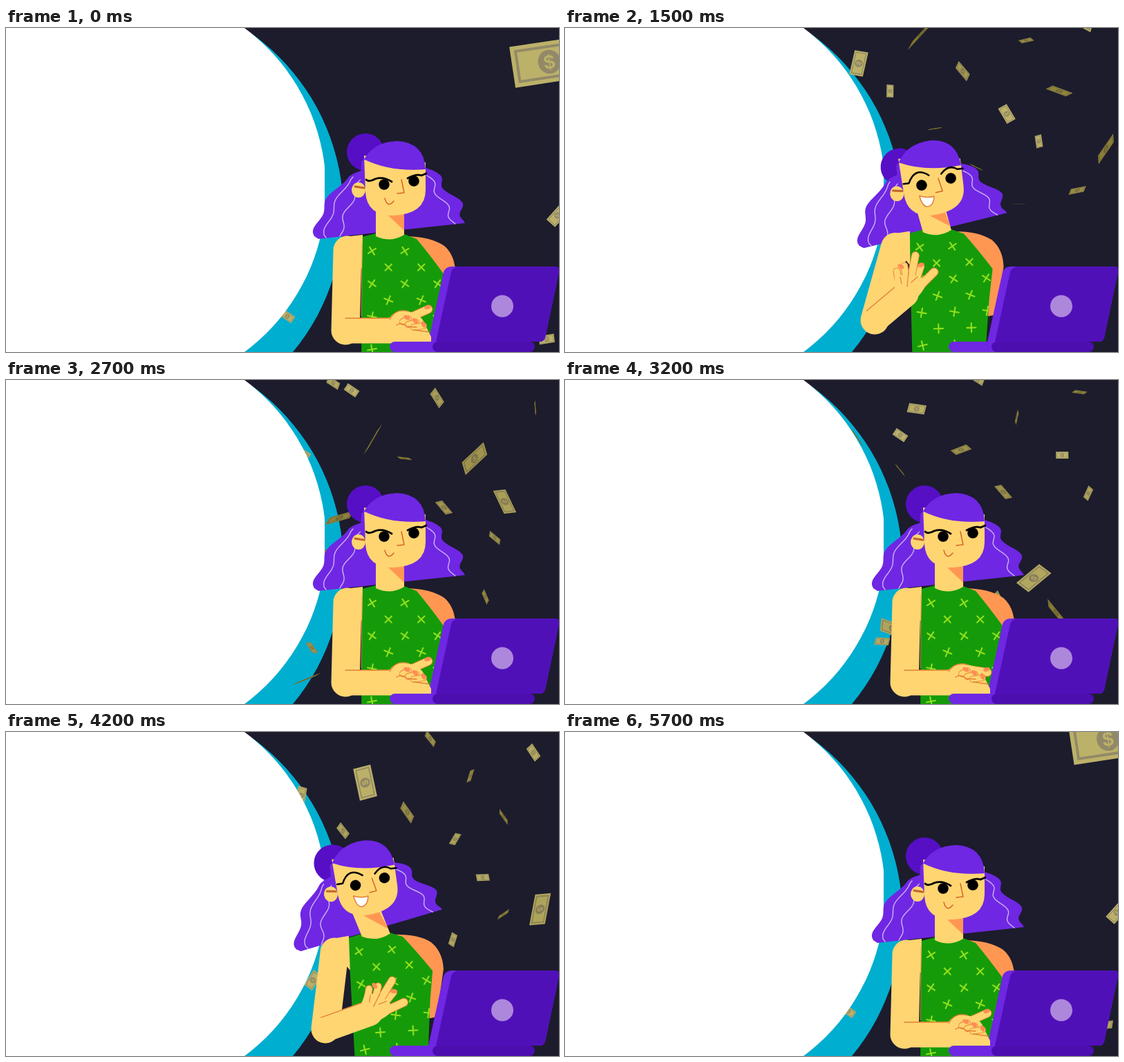
Recreate the animation shown at these times as an HTML page with a canvas. Size 800x470 px, loop 5.8 s.

```html
<!DOCTYPE html>
<html lang="en">
<head>
<meta charset="utf-8">
<title>Money rain</title>
<style>
html, body { margin: 0; width: 100%; height: 100%; overflow: hidden; background: #1c1c2d; }
canvas { display: block; }
</style>
</head>
<body>
<canvas id="stage" width="800" height="470"></canvas>
<script>
const ctx = document.getElementById('stage').getContext('2d');
const LOOP = 5800, STEP = 100, CYCLE = 2900;
const SKIN = '#ffd572', SHADE = '#ff9752', LINE = '#e57f35', NOSE = '#d5652b',
      HAIR = '#6f27e3', DEEP = '#5010b8', GREEN = '#159b0a', LIME = '#93e01c';

const mix = (a, b, k) => a + (b - a) * k;
const mixAll = (a, b, k) => a.map((v, i) => mix(v, b[i], k));
const ease = k => k * k * (3 - 2 * k);
const noise = n => { const s = Math.sin(n * 127.1 + 3.7) * 43758.5453; return s - Math.floor(s); };

function shape(d, color) { ctx.fillStyle = color; ctx.fill(new Path2D(d)); }
function line(d, color, w) {
  ctx.strokeStyle = color;
  ctx.lineWidth = w;
  ctx.lineCap = ctx.lineJoin = 'round';
  ctx.stroke(new Path2D(d));
}
const bar = (a, b, color, w) => line(`M${a}L${b}`, color, w);
function oval(x, y, color, rx, ry = rx, rot = 0) {
  ctx.beginPath();
  ctx.ellipse(x, y, rx, ry, rot, 0, 7);
  ctx.fillStyle = color;
  ctx.fill();
}
// Move the pivot to (x, y) and turn around it: for drawing, and for one point
function placed([px, py], x, y, turn, draw) {
  ctx.save();
  ctx.translate(x, y);
  ctx.rotate(turn);
  ctx.translate(-px, -py);
  draw();
  ctx.restore();
}
function moved([px, py], x, y, turn, [qx, qy]) {
  const c = Math.cos(turn), s = Math.sin(turn), dx = qx - px, dy = qy - py;
  return [x + dx * c - dy * s, y + dx * s + dy * c];
}

/* ---------- falling bills ---------- */
const still = { ax: 0, spin: 0, roll: 0, tilt: 0 };
const bills = [
  { ...still, t: LOOP, x: 786, y: 49, vx: 20, vy: 390, ax: 150, size: 54, angle: -.15 },
  { ...still, t: LOOP, x: 798, y: 272, vx: 10, vy: 100, ax: 150, size: 15, angle: -.84 },
  { ...still, t: LOOP, x: 407, y: 418, vx: -30, vy: 130, size: 10, angle: .6 }
];
for (let i = 0; i < 52; i++) {
  const r = k => noise(i * 7 + k), size = 9 + 17 * r(1) ** 4;
  bills.push({
    t: 330 + i * 74, x: 410 + 390 * (i * .618 % 1), y: -15, ax: 0,
    vx: 50 * r(2) - 25, vy: 175 + 8 * size, size,
    angle: 6.3 * r(3), spin: 3 * r(4) - 1.5, tilt: 6.3 * r(5), roll: 2 + 3 * r(6)
  });
}

function drawBill(b, t) {
  const dt = (t - b.t) / 1000, y = b.y + b.vy * dt;
  if (y < -60 || y > 530) return;
  const tilt = b.tilt + b.roll * dt, tone = .55 + .45 * Math.cos(tilt * 2);
  const rgb = (p, q) => `rgb(${mixAll(p, q, tone).map(Math.round)})`;
  const face = rgb([125, 113, 42], [188, 177, 104]), ink = rgb([92, 82, 38], [146, 137, 104]);
  const rect = (w, h, color) => { ctx.fillStyle = color; ctx.fillRect(-w, -h, 2 * w, 2 * h); };
  ctx.save();
  ctx.translate(b.x + b.vx * dt + b.ax * dt * dt, y);
  ctx.rotate(b.angle + b.spin * dt);
  ctx.scale(b.size / 56, b.size / 56);
  ctx.transform(1, 0, .5 * Math.sin(tilt), Math.cos(tilt), 0, 0);
  rect(56, 31, face);
  rect(50, 25, ink);
  rect(46, 21, face);
  oval(0, 0, ink, 17, 18);
  ctx.fillStyle = face;
  ctx.font = 'bold 30px "Liberation Sans", Arial, sans-serif';
  ctx.textAlign = 'center';
  ctx.fillText('$', 0, 10.5);
  ctx.restore();
}

/* ---------- poses ---------- */
const EYES = [568.5, 224.5], CHEST = [577, 371], SHOULDER = [494, 322], WRIST = [495, 385];
// head and body: x, y, turn; hair: turn and drop of the bun
const type = { head: [568.5, 224.5, 0], hair: [0, 0], body: [577, 371, 0],
  elbow: [491, 439], wrist: [560, 439], open: [0] };
const lean = { ...type, head: [552, 230, -.073], hair: [-.15, 3], body: [574.5, 371, 0], elbow: [489, 440] };
const coil = { ...lean, head: [554.5, 229.5, -.045], hair: [-.092, 1], elbow: [487, 440] };
const swing = { head: [526.5, 217, -.135], hair: [-.18, 11], body: [561, 363, -.06],
  elbow: [462, 431], wrist: [526, 408], open: [1] };
const touch = { head: [537, 223, -.119], hair: [-.133, 17], body: [562, 364, -.03],
  elbow: [448, 424], wrist: [493, 386], open: [1] };
const acts = [[0, type], [300, type], [650, lean], [900, lean], [1300, swing], [1500, touch], [2200, touch],
  [2600, type], [3200, type], [3550, coil], [3800, coil], [4200, swing], [4400, touch], [5100, touch],
  [5500, type], [LOOP, type]];

function poseAt(t) {
  let i = 0;
  while (t >= acts[i + 1][0]) i++;
  const [t0, a] = acts[i], [t1, b] = acts[i + 1], k = ease((t - t0) / (t1 - t0)), pose = {};
  for (const part in a) pose[part] = mixAll(a[part], b[part], k);
  return pose;
}

/* ---------- figure ---------- */
// Wavy lock from one point to another, as path steps
function lock(x0, y0, x1, y1, bulge, ripple) {
  let d = '';
  for (let i = 0; i <= 24; i++) {
    const k = i / 24;
    const x = mix(x0, x1, k) + bulge * Math.sqrt(Math.abs(Math.sin(Math.PI * k))) + ripple * Math.sin(4 * Math.PI * k);
    d += `L${x} ${mix(y0, y1, k)}`;
  }
  return d;
}
const strand = (...p) => line('M' + lock(...p).slice(1), '#cdb2f6', 1.4);

function drawHair([x, y, turn], [hairTurn, drop]) {
  placed(EYES, x, y + drop, turn, () => oval(520, 180, '#560fc5', 27));
  placed(EYES, x, y, hairTurn, () => {
    shape('M545 195' + lock(607, 203, 664, 283, 11, 7) + lock(452, 306, 503, 211, -17, -4) + 'Z', HAIR);
    strand(502, 216, 463, 304, -8, 3);
    strand(516, 218, 483, 302, -4, -4);
    strand(609, 214, 650, 284, 1, 5);
  });
}

function drawBody([x, y, turn], head) {
  placed(CHEST, x, y, turn, () => {
    shape('M570 302Q612 301 634 316Q650 330 650 356L636 425L600 430Z', SHADE);
    const dress = 'M515 303L535 298Q556 308 576 299L594 306Q614 330 634 358L628 400L618 500H514Z';
    shape(dress, GREEN);
    ctx.clip(new Path2D(dress));
    for (let row = -3; row <= 4; row++) for (let col = -2; col <= 2; col++) {
      const cx = CHEST[0] + (col + (row & 1) / 2) * 47.5, cy = CHEST[1] + row * 23.8;
      placed([0, 0], cx, cy, .6 - .2 * row, () => line('M-6.5 0H6.5M0 -6.5V6.5', LIME, 2.1));
    }
  });
  const up = p => moved(EYES, ...head, p), down = p => moved(CHEST, x, y, turn, p);
  const left = down([535, 302]), right = down([576, 300]);
  const jaw = up([576, 258]);
  shape(`M${up([535, 258])}L${jaw}L${right}Q${down([556, 312])} ${left}Z`, SKIN);
  shape(`M${up([553, 272])}L${up([576, 270])}L${mixAll(jaw, right, .85)}Z`, SHADE);
}

function drawHead(head, happy) {
  placed(EYES, ...head, () => {
    shape('M513 224L514 194L522 186L524 224Z', HAIR);
    oval(510, 235, SKIN, 10, 11);
    line('M505 230L518 232', '#c0642a', 3);
    shape('M518 185L520 238Q522 272 560 272Q607 270 607 235V195Z', SKIN);
    shape('M516 194Q530 165 566 164Q605 166 607 205Q556 209 519 191Z', HAIR);
    oval(547, 227, '#000', 7.8);
    oval(590, 222, '#000', 7.8);
    if (happy) {
      line('M521 222H529Q540 199 559 214M577 214Q589 201 601 210H609', '#000', 2.5);
      const mouth = 'M542 242Q553 247 563 245Q561 259 551 259Q544 257 542 242Z';
      shape(mouth, '#fff');
      line(mouth, LINE, 1.5);
    } else {
      line('M521 220Q525 224 534 219Q546 215 558 223M581 218Q594 211 601 214L608 211', '#000', 2.8);
      line('M548 247Q552 262 561 251', NOSE, 1.5);
    }
    line('M572 220L576 239L566 240', NOSE, 1.5);
  });
}

function finger(a, b, w) {
  bar(a, b, LINE, w + 1.8);
  bar(a, b, SKIN, w);
}
const nail = (x, y, rot) => oval(x, y, '#ff8d55', 5, 3, rot);

function typingHand(press) {
  const top = 411 + press * 2;
  finger([584, 420], [611, 408 + press * 16], 11);
  shape(`M552 424Q564 ${top - 5} 582 ${top}Q602 416 606 430L615 448V455H552Z`, SKIN);
  line(`M555 423Q564 ${top - 5} 582 ${top}`, LINE, 1.3);
  for (let i = 0; i < 3; i++) {
    finger([574 + i * 8, 426 + i * 4], [582 + i * 11, 422 + i * 5], 8);
    nail(580 + i * 12, 420 + i * 5, .5 + i * .35);
  }
  nail(610, 405 + press * 15, -.3);
  line('M565 431Q572 426 580 433L594 434M590 438L612 441', LINE, 1.3);
}
function openHand() {
  finger([510, 366], [517, 345], 9);
  finger([502, 365], [509, 329], 10);
  finger([508, 381], [536, 353], 11);
  finger([496, 368], [493, 344], 9);
  finger([486, 374], [482, 352], 9);
  shape('M479 378V360Q500 352 519 362L524 372Q512 396 496 396Z', SKIN);
  nail(488, 345, .5);
  nail(517, 343, -.4);
  line('M487 360L489 370M499 354L497 374M512 360L503 368', LINE, 1.2);
}

function drawArm({ body, elbow, wrist, open }, press, ticks) {
  const at = p => moved(CHEST, ...body, p), shoulder = at(SHOULDER);
  shape(`M${at([516, 300])}L${at([490, 303])}L${shoulder}L${at([515, 350])}Z`, SKIN);
  bar(shoulder, elbow, SKIN, 41);
  bar(elbow, wrist, SKIN, 37);
  const turn = Math.atan2(wrist[1] - elbow[1], wrist[0] - elbow[0]);
  const edge = ([x, y]) => [x + 18 * Math.sin(turn), y - 18 * Math.cos(turn)];
  bar(edge(elbow), edge(wrist), LINE, 1.4);
  if (open[0] > .5) return placed(WRIST, ...wrist, turn + .7, openHand);
  bar(at([515, 312]), at([514, 418]), SHADE, .8);
  placed([560, 439], ...wrist, turn, () => typingHand(press));
  if (ticks) line('M598 398L600 401M605 397V400M612 398L611 400', '#fff', 3);
}

function drawScreen() {
  const lid = (x, color) => shape(`M${x + 34} 346H794Q801 346 800 354L780 449Q778 455 772 455H${x}
    L${x + 22} 354Q${x + 25} 346 ${x + 34} 346Z`, color);
  lid(611, HAIR);
  lid(622, DEEP);
  oval(718, 403.5, '#ac87dc', 16);
}
function drawBase() {
  bar([562.5, 462.5], [640, 462.5], HAIR, 15);
  bar([624.5, 462.5], [757.5, 462.5], '#4c0eaf', 15);
}

function drawScene(t) {
  ctx.fillStyle = '#1c1c2d';
  ctx.fillRect(0, 0, 800, 470);
  oval(169, 267, '#00aed0', 319);
  for (const b of bills) {
    drawBill(b, t);
    drawBill(b, t + LOOP);
  }
  ctx.save();
  ctx.beginPath();
  ctx.rect(0, 0, 461, 470);
  ctx.clip();
  oval(170, 235, '#fff', 293);
  ctx.fillRect(0, 0, 170, 470);
  ctx.restore();

  const pose = poseAt(t), phase = t % CYCLE;
  const press = phase < 1000 ? Math.floor(phase / STEP) % 2 : 0;
  drawHair(pose.head, pose.hair);
  drawBody(pose.body, pose.head);
  drawHead(pose.head, pose.open[0] > .5);
  drawScreen();
  drawArm(pose, press, press && t % 400 === 300);
  drawBase();
}

let start;
function tick(now) {
  if (start === undefined) start = now;
  const t = (now - start) % LOOP;
  drawScene(Math.floor(t / STEP) * STEP);
  requestAnimationFrame(tick);
}
drawScene(0);
requestAnimationFrame(tick);
</script>
</body>
</html>
```
